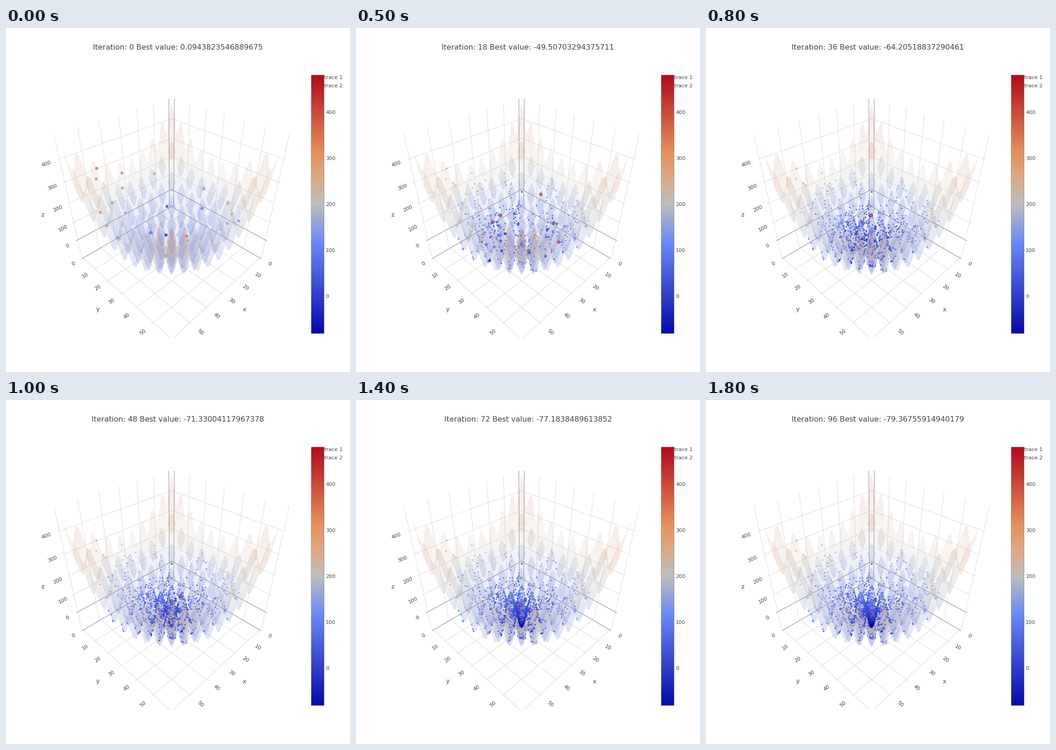
These frames come from a looping animation (748x748 px, 1900 ms). A matplotlib script:

```python
import numpy as np
import matplotlib.pyplot as plt
from matplotlib.animation import FuncAnimation
from matplotlib.colors import LinearSegmentedColormap, Normalize
from matplotlib.patches import Rectangle

SIZE, DPI = 748, 88
PT = 72 / DPI                       # points per pixel
CX, CY, FOCAL = 360, 382.5, 692     # screen centre and focal length
EYE = 1.25 * np.sqrt(3)             # camera distance along the diagonal
R2, R3, R6 = np.sqrt([2, 3, 6])
SPAN, Z_SPAN, Z_MID = 59 * 34 / 32, 596.6, 199.75
LO, HI = 29.5 - SPAN / 2, 29.5 + SPAN / 2
Z_LO, Z_HI = Z_MID - Z_SPAN / 2, Z_MID + Z_SPAN / 2
LAYER = 0.12                        # opacity of one surface layer
INK, GRID, ZERO = "#444444", "#dcdcdc", "#85858a"

STOPS = [(0, (5, 10, 172)), (.35, (106, 137, 247)), (.5, (190, 190, 190)),
         (.6, (220, 170, 132)), (.7, (230, 145, 90)), (1, (178, 10, 28))]
CMAP = LinearSegmentedColormap.from_list(
    "heat", [(p, tuple(c / 255 for c in rgb)) for p, rgb in STOPS], N=512)
NORM = Normalize(-81, 481)

BEST = ["0.0943823546889675", "-34.09694079476492", "-43.68215079312846",
        "-49.50703294375711", "-54.87120936415283", "-59.794162170389654",
        "-64.20518837290461", "-68.04733926158217", "-71.33004117967378",
        "-73.15920648237195", "-74.90418275360621", "-76.26731940582714",
        "-77.1838489613852", "-77.90251736481903", "-78.51640927358264",
        "-79.01872946350817", "-79.36755914940179"]

# start and sixth-step place of each particle: screen x, y and height
PARTICLES = [
    (197, 305, 470, 273, 351, 300), (196, 328, 460, 239, 391, 270),
    (252, 316, 400, 277, 350, 300), (253, 347, 330, 283, 415, 180),
    (323, 316, 370, 338, 337, 330), (205, 401, 410, 254, 437, 320),
    (231, 380, 290, 244, 406, 200), (219, 430, 370, 249, 450, 240),
    (259, 402, 280, 270, 423, 280), (350, 388, 260, 354, 381, 230),
    (426, 392, 270, 424, 423, 60), (430, 350, 300, 427, 334, 330),
    (482, 381, 370, 483, 384, 330), (491, 404, 300, 473, 387, 290),
    (506, 419, 290, 492, 412, 280), (481, 425, 330, 465, 462, 150),
    (467, 437, 200, 441, 462, 10), (314, 445, 310, 334, 492, 60),
    (393, 452, 430, 397, 455, 180), (395, 463, 250, 380, 515, -20),
    (247, 458, 290, 278, 462, 150), (242, 456, 260, 268, 407, 150),
    (348, 450, 220, 355, 475, 20), (348, 501, 260, 364, 520, 0)]


def height(x, y):
    def ridge(i):
        u = (i - 30) * 0.15
        return 9 * u ** 2 + 9 - 49 * np.cos(2 * np.pi * u)
    return ridge(x) + ridge(y)


def to_box(x, y, z):
    return (x - 29.5) / SPAN, (y - 29.5) / SPAN, (z - Z_MID) / Z_SPAN


def project(x, y, z):
    """Screen x, screen y and depth of a data point."""
    bx, by, bz = to_box(x, y, z)
    d = EYE - (bx + by + bz) / R3
    return (CX + FOCAL * (by - bx) / R2 / d,
            CY - FOCAL * (2 * bz - bx - by) / R6 / d, d)


def locate(px, py, guess):
    """Surface point under a pixel, the one closest to the guessed height."""
    z = np.linspace(-80, 480, 1500)
    bz = (z - Z_MID) / Z_SPAN
    a, b = (px - CX) * R2 / FOCAL, (CY - py) * R6 / FOCAL
    d = (EYE - R3 * bz) / (1 - b / R3)
    s = 2 * bz - b * d
    x, y = 29.5 + SPAN * (s - a * d) / 2, 29.5 + SPAN * (s + a * d) / 2
    outside = np.maximum(abs(x - 29.5), abs(y - 29.5)) > 29.5
    best = np.argmin(abs(height(x, y) - z) + 0.2 * abs(z - guess) + 900 * outside)
    return np.clip([x[best], y[best]], 0, 59)


def layers_in_front(x, y, z):
    """How often the line of sight from a point to the eye meets the surface."""
    s = np.linspace(0.012, 0.6, 90)
    bx, by, bz = (b[..., None] * (1 - s) + 1.25 * s for b in to_box(x, y, z))
    gx, gy = 29.5 + SPAN * bx, 29.5 + SPAN * by
    above = height(gx, gy) < Z_MID + Z_SPAN * bz
    inside = (abs(gx - 29.5) < 29.5) & (abs(gy - 29.5) < 29.5)
    crossed = (above[..., 1:] != above[..., :-1]) & inside[..., 1:]
    return crossed.sum(-1)


def render_surface(x0, y0, w, h, ss=2):
    """Blend the translucent triangles back to front into an RGBA image."""
    gx, gy = np.meshgrid(np.arange(60.), np.arange(60.), indexing="ij")
    gz = height(gx, gy)
    sx, sy, depth = (v.ravel() for v in project(gx, gy, gz))
    pts = np.stack([(sx - x0) * ss, (sy - y0) * ss], -1)
    tint = 0.75 * CMAP(NORM(gz.ravel()))[:, :3] + 0.25 * 0.58
    k = np.arange(3600).reshape(60, 60)
    a, b, c, d = (q.ravel() for q in
                  (k[:-1, :-1], k[1:, :-1], k[1:, 1:], k[:-1, 1:]))
    tris = np.concatenate([np.stack([a, b, c], 1), np.stack([a, c, d], 1)])
    tris = tris[np.argsort(-depth[tris].mean(1))]
    img = np.zeros((h * ss, w * ss, 4))
    for t in tris:
        (ax_, ay), (bx, by), (cx, cy) = p = pts[t]
        area = (bx - ax_) * (cy - ay) - (by - ay) * (cx - ax_)
        if abs(area) < 1e-9:
            continue
        left, top = np.floor(p.min(0)).astype(int)
        right, low = np.ceil(p.max(0)).astype(int) + 1
        xs = np.arange(left, right) + 0.5
        ys = np.arange(top, low)[:, None] + 0.5
        w1 = ((xs - ax_) * (cy - ay) - (ys - ay) * (cx - ax_)) / area
        w2 = ((bx - ax_) * (ys - ay) - (by - ay) * (xs - ax_)) / area
        hit = (w1 >= 0) & (w2 >= 0) & (w1 + w2 <= 1)
        patch = img[top:low, left:right]
        patch[hit] = patch[hit] * (1 - LAYER) + LAYER * np.append(tint[t].mean(0), 1)
    img = img.reshape(h, ss, w, ss, 4).mean((1, 3))
    img[..., :3] /= np.maximum(img[..., 3:], 1e-6)
    return np.clip(img, 0, 1)


def simulate(steps=97):
    """Grid places of all particles at every step, drawn in to the centre."""
    rng = np.random.default_rng(4)
    start = np.array([locate(*p[:3]) for p in PARTICLES])
    mid = np.array([locate(*p[3:]) for p in PARTICLES])
    n = len(PARTICLES)
    rate, spin = rng.uniform(0.03, 0.055, n), rng.normal(0, 0.5, n)
    path = np.empty((steps, n, 2))
    for k in range(steps):
        noise = rng.normal(0, 1, (n, 2))
        if k <= 6:
            path[k] = start + (mid - start) * k / 6 + noise * k * (6 - k) / 9
            continue
        r = np.exp(-rate * (k - 6))
        turn = spin * (1 - r)
        dx, dy = (mid - 30).T * r
        path[k, :, 0] = 30 + dx * np.cos(turn) - dy * np.sin(turn)
        path[k, :, 1] = 30 + dx * np.sin(turn) + dy * np.cos(turn)
        path[k] += noise * 2.5 * np.exp(-0.015 * (k - 6))
    return np.clip(path, 0, 59)


fig = plt.figure(figsize=(SIZE / DPI, SIZE / DPI), dpi=DPI, facecolor="white")
ax = fig.add_axes([0, 0, 1, 1])
ax.axis("off")


def segment(p, q, zero=False):
    (x0, y0, _), (x1, y1, _) = project(*p), project(*q)
    ax.plot([x0, x1], [y0, y1], color=ZERO if zero else GRID, lw=PT,
            zorder=2 if zero else 1, solid_capstyle="butt")


def label(x, y, text, px=11.2, **kw):
    kw = {"ha": "center", "va": "center", **kw}
    return ax.text(x, y, text, fontsize=px * PT, color=INK, zorder=9,
                   family="DejaVu Sans", **kw)


def tick(edge, inner, text):
    """Label outside the edge, slanted along its grid line."""
    (x0, y0, d), (x1, y1, _) = project(*edge), project(*inner)
    vx, vy = x0 - x1, y0 - y1
    step = 51 / d / np.hypot(vx, vy)
    angle = np.degrees(np.arctan2(vy, -vx)) if vx < 0 else -np.degrees(np.arctan2(vy, vx))
    label(x0 + vx * step, y0 + vy * step + 0.7, text,
          rotation=angle, rotation_mode="anchor")


for v in range(0, 61, 10):
    zero = v == 0
    segment((v, LO, Z_LO), (v, HI, Z_LO), zero)
    segment((LO, v, Z_LO), (HI, v, Z_LO), zero)
    segment((v, LO, Z_LO), (v, LO, Z_HI), zero)
    segment((LO, v, Z_LO), (LO, v, Z_HI), zero)
    if v < 60:
        tick((HI, v, Z_LO), (HI - 5, v, Z_LO), str(v))
        tick((v, HI, Z_LO), (v, HI - 5, Z_LO), str(v))
for v in range(0, 401, 100):
    segment((LO, LO, v), (HI, LO, v), v == 0)
    segment((LO, LO, v), (LO, HI, v), v == 0)
    tick((HI, LO, v), (HI - 5, LO, v), str(v))
    label(695, 584 - v, str(v), ha="left")
ax.add_patch(Rectangle((0, 672.5), SIZE, 80, color="white", lw=0, zorder=3))

for x, y, text in ((519, 613, "x"), (199, 612, "y"), (79.5, 406, "z")):
    label(x, y, text, 13)
label(692, 108, "trace 1", ha="left")
label(692, 126, "trace 2", ha="left")
title = label(374, 47, "", 16.1, va="baseline")

bar = CMAP(np.linspace(1, 0, 562))[:, None, :3]
ax.imshow(bar, extent=(664, 692, 664, 102), aspect="auto",
          interpolation="nearest", zorder=4)
ax.add_patch(Rectangle((663.5, 102.5), 28, 561, fill=False, ec="#77777a",
                       lw=0.6 * PT, zorder=5))
ax.imshow(render_surface(100, 150, 520, 400), extent=(100, 620, 550, 150),
          aspect="auto", interpolation="nearest", zorder=4)
ax.set_xlim(0, SIZE)
ax.set_ylim(SIZE, 0)

path = simulate()
gx, gy = path[..., 0], path[..., 1]
values = height(gx, gy)
screen = np.stack(project(gx, gy, values)[:2], -1)
colors = CMAP(NORM(values))
colors[..., 3] = (1 - LAYER) ** layers_in_front(gx, gy, values)

origin_x, origin_y, _ = project(0, 0, 0)
origin = ax.scatter([origin_x], [origin_y], s=(3.2 * PT) ** 2, lw=0,
                    color=[CMAP(NORM(-40))], zorder=5)
trail = ax.scatter([], [], s=(3.2 * PT) ** 2, lw=0, zorder=6)
swarm = ax.scatter([], [], zorder=7)


def update(i):
    shot = max(0, i - 2)
    k = 6 * shot
    title.set_text(f"Iteration: {k} Best value: {BEST[shot]}")
    origin.set_visible(k > 0)
    trail.set_offsets(screen[:k].reshape(-1, 2))
    trail.set_facecolors(colors[:k].reshape(-1, 4))

    face = colors[k].copy()
    edge = face * (0.85, 0.85, 0.85, 1)
    size = np.full(len(face), 6.0 if k == 0 else 3 + 3.5 * np.exp(-(k - 6) / 25))
    if k:
        count = round(12 * np.exp(-k / 25))
        worst = np.argsort(-values[k])[:count]
        edge[worst] = (0.65, 0.1, 0.08, 1)
        size[worst] = 5.6
    swarm.set_offsets(screen[k])
    swarm.set_facecolors(face)
    swarm.set_edgecolors(edge)
    swarm.set_sizes((size * PT) ** 2)
    swarm.set_linewidths([(0.5 if k == 0 else 1.2) * PT])
    return title, origin, trail, swarm


anim = FuncAnimation(fig, update, frames=19, interval=100, repeat=True,
                     repeat_delay=0, blit=False)
plt.show()
```
